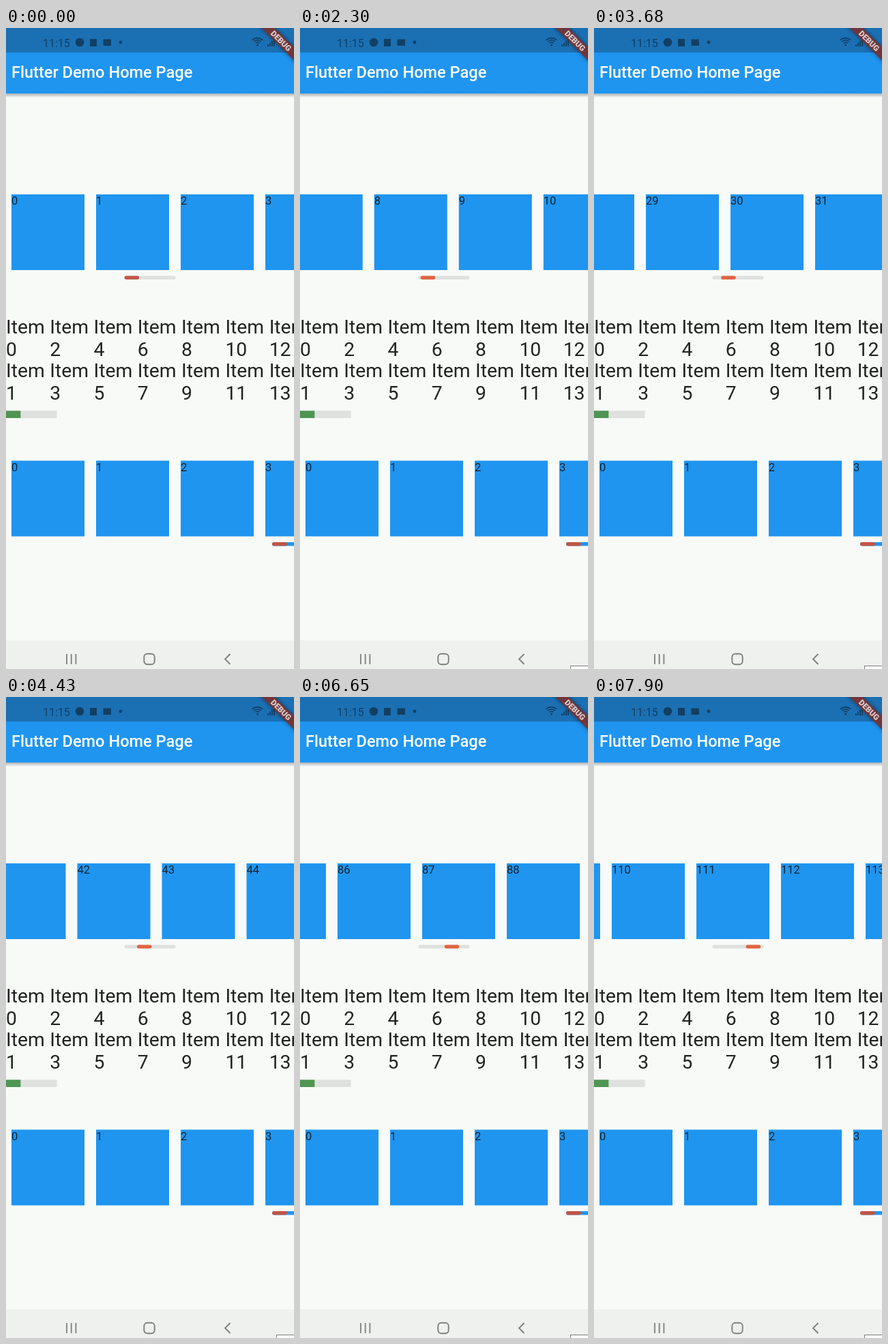
An HTML page with a canvas that plays this animation: 422 px wide and 940 px high, repeating every 7.99 s.

```html
<!DOCTYPE html>
<html lang="en">
<head>
<meta charset="utf-8">
<title>Scroll indicators</title>
<style>
html, body { margin: 0; width: 100%; height: 100%; overflow: hidden; background: #f8faf8; }
canvas { display: block; width: 422px; height: 940px; }
</style>
</head>
<body>
<canvas id="stage"></canvas>
<script>
const W = 422, H = 940, LOOP = 7990;
const BLUE = '#1f95f0', STATUS = '#1b70b4', INK = '#123f63', TEXT = '#202320';
const TRACK = '#dfe1df', RED = '#c15546', ORANGE = '#e06441', GREEN = '#4f9553';
const PITCH = 124, FONT = 'Roboto, Inter, sans-serif';

const canvas = document.getElementById('stage');
const ctx = canvas.getContext('2d');
const dpr = window.devicePixelRatio || 1;
canvas.width = W * dpr;
canvas.height = H * dpr;

// [time in ms, screen refresh count]
const ticks = [[1670, 0], [2440, 10], [2520, 11], [2910, 16], [3300, 21], [3370, 22],
  [4140, 32], [4210, 33], [4430, 36], [4990, 43], [5080, 44], [5700, 52], [5850, 54],
  [5940, 55], [6650, 64], [6740, 65], [7500, 75], [7570, 76], [7900, 80]];
// [refresh count, scroll offset, speed]
const path = [[0, 2, 50], [16, 2144.5, 141], [36, 5111.5, 181],
  [52, 8875.5, 180], [64, 10617, 164], [80, 13622, 188]];

function tickAt(t) {
  const i = ticks.findIndex(k => k[0] > t);
  if (i < 0) return 80;
  const [t0, n0] = ticks[i - 1], [t1, n1] = ticks[i];
  return Math.floor(n0 + (n1 - n0) * (t - t0) / (t1 - t0) + 1e-6);
}

function scrollAt(t) {
  if (t < 1670) return 0;
  const n = tickAt(t);
  const i = Math.max(1, path.findIndex(p => p[0] >= n));
  const [n0, s0, v0] = path[i - 1], [n1, s1, v1] = path[i];
  const d = n1 - n0, u = (n - n0) / d, w = 1 - u;
  return s0 * w * w * (1 + 2 * u) + s1 * u * u * (3 - 2 * u)
    + d * u * w * (v0 * w - v1 * u);
}

function rect(x, y, w, h, color) {
  ctx.fillStyle = color;
  ctx.fillRect(x, y, w, h);
}

function pill(x, y, w, h, color, r = h / 2) {
  ctx.fillStyle = color;
  ctx.beginPath();
  ctx.roundRect(x, y, w, h, r);
  ctx.fill();
}

function disc(x, y, r, color) {
  ctx.fillStyle = color;
  ctx.beginPath();
  ctx.arc(x, y, r, 0, 7);
  ctx.fill();
}

function line(points, color, width) {
  ctx.strokeStyle = color;
  ctx.lineWidth = width;
  ctx.beginPath();
  points.forEach(([x, y]) => ctx.lineTo(x, y));
  ctx.stroke();
}

function label(str, x, y, size, color = TEXT, weight = 400) {
  ctx.font = `${weight} ${size}px ${FONT}`;
  ctx.fillStyle = color;
  ctx.fillText(str, x, y);
}

function cards(y, offset) {
  const first = Math.max(0, Math.floor((offset - 8) / PITCH));
  for (let n = first; n < first + 5; n++) {
    const x = 8 + n * PITCH - offset;
    rect(x, y, 107, 111, BLUE);
    label(n, x, y + 15.2, 16.5, '#15222d');
  }
}

function grid() {
  for (let col = 0; col < 7; col++) {
    for (let row = 0; row < 2; row++) {
      const x = col * 64.28, y = 448 + row * 64.28;
      label('Item', x, y, 28.28);
      label(col * 2 + row, x, y + 33, 28.28);
    }
  }
}

function appBar() {
  const shade = ctx.createLinearGradient(0, 96, 0, 102);
  shade.addColorStop(0, 'rgba(60,75,90,.42)');
  shade.addColorStop(1, 'rgba(60,75,90,0)');
  rect(0, 96, W, 6, shade);
  rect(0, 36, W, 60, BLUE);
  rect(0, 0, W, 36, STATUS);
  label('Flutter Demo Home Page', 8, 73, 23.57, '#fff', 500);
}

function statusIcons() {
  label('11:15', 54, 27.5, 16, INK);
  disc(108, 21, 6.3, INK);
  rect(123, 16, 10, 11, INK);
  rect(142.5, 16.5, 11.5, 9.5, INK);
  disc(168, 21, 2.4, INK);
  ctx.strokeStyle = INK;
  ctx.lineWidth = 1.6;
  for (const r of [4, 7.2, 10.4]) {
    ctx.beginPath();
    ctx.arc(368.5, 25, r, -Math.PI * 0.76, -Math.PI * 0.24);
    ctx.stroke();
  }
  disc(368.5, 25, 1.5, INK);
  for (let i = 0; i < 4; i++) rect(383 + i * 3, 24 - i * 2.6, 1.8, 3 + i * 2.6, INK);
}

function debugBanner() {
  ctx.save();
  ctx.translate(W, 0);
  ctx.rotate(Math.PI / 4);
  ctx.shadowColor = 'rgba(0,0,0,.5)';
  ctx.shadowBlur = 6 * dpr;
  rect(-44, 20, 88, 13.5, '#70363b');
  ctx.shadowBlur = 0;
  ctx.shadowColor = 'transparent';
  ctx.textAlign = 'center';
  label('DEBUG', 0, 30.8, 11.6, '#dccfcf', 900);
  ctx.restore();
}

function navBar() {
  const gray = '#7d807d';
  rect(0, 898, W, 42, '#eff1ef');
  for (const x of [89, 95.7, 102.4]) line([[x, 918], [x, 933]], gray, 1.8);
  ctx.lineWidth = 1.9;
  ctx.beginPath();
  ctx.roundRect(202.3, 917.8, 15.4, 15.4, 4.6);
  ctx.stroke();
  line([[328.5, 918], [321, 925.5], [328.5, 933]], gray, 1.9);
}

function cornerBox(t) {
  if (t < 370) return;
  ctx.globalAlpha = t < 440 ? 0.35 : t < 510 ? 0.7 : 1;
  rect(396, 935, 26, 5, '#7c7c7c');
  rect(397, 936, 25, 4, '#fff');
  ctx.globalAlpha = 1;
}

function draw(t) {
  const offset = scrollAt(t);
  ctx.setTransform(dpr, 0, 0, dpr, 0, 0);
  rect(0, 0, W, H, '#f8faf8');

  cards(244, offset);
  pill(173.5, 363.4, 75, 5.4, TRACK);
  pill(173.5 + offset * 0.0036, 363.4, 21.6, 5.4, offset > 2 ? ORANGE : RED);

  grid();
  rect(0, 561.3, 74.6, 10.7, TRACK);
  rect(0, 561.3, 21.4, 10.7, GREEN);

  cards(634.5, 0);
  pill(390, 754, 75, 5.4, BLUE);
  pill(390, 754, 21.8, 5.4, RED);

  appBar();
  statusIcons();
  debugBanner();
  navBar();
  cornerBox(t);
}

const start = performance.now();
function frame() {
  draw((performance.now() - start) % LOOP);
  requestAnimationFrame(frame);
}
draw(0);
requestAnimationFrame(frame);
</script>
</body>
</html>
```
